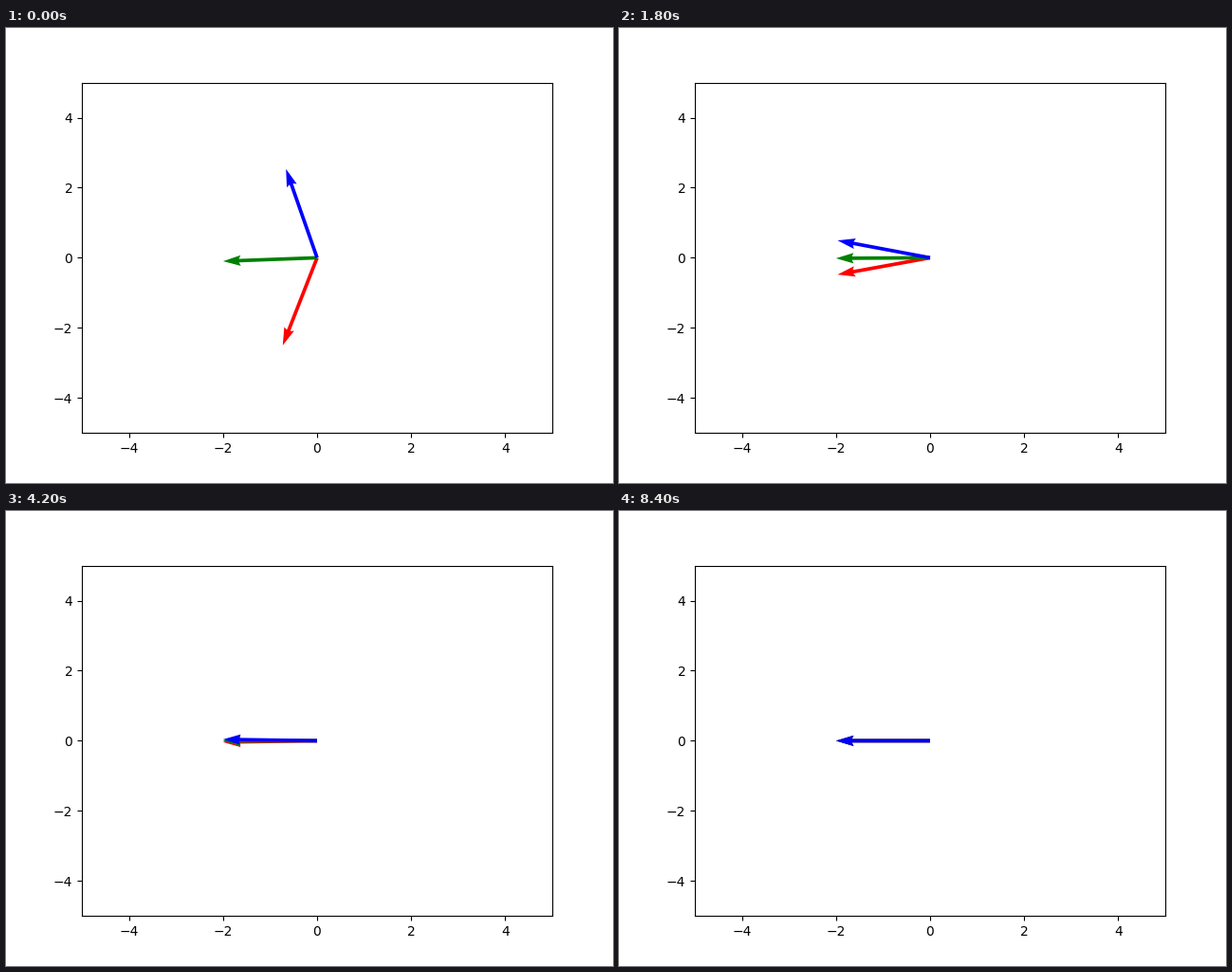
A matplotlib script for the animation above (10 s loop, 640 px wide and 480 px high).

```python
import numpy as np
import matplotlib.pyplot as plt
from matplotlib.animation import FuncAnimation

FRAMES = 100
INTERVAL = 100  # ms
DECAY = 0.9     # share of the offset kept at each step
MEAN_HEADING = np.pi
START_OFFSETS = np.radians([68.6, 2.1, -70.7])
COLORS = ["red", "green", "blue"]


def headings(step):
    """Headings drawn together towards their mean."""
    return MEAN_HEADING + START_OFFSETS * DECAY**step


def components(step):
    angles = headings(step)
    return np.cos(angles), np.sin(angles)


fig, ax = plt.subplots(figsize=(6.4, 4.8), dpi=100)
ax.set_xlim(-5, 5)
ax.set_ylim(-5, 5)

origin = np.zeros(len(COLORS))
arrows = ax.quiver(origin, origin, *components(0), color=COLORS, scale=5)


def update(step):
    arrows.set_UVC(*components(step))
    return (arrows,)


anim = FuncAnimation(fig, update, frames=FRAMES, interval=INTERVAL,
                     repeat=True, repeat_delay=0)
plt.show()
```
